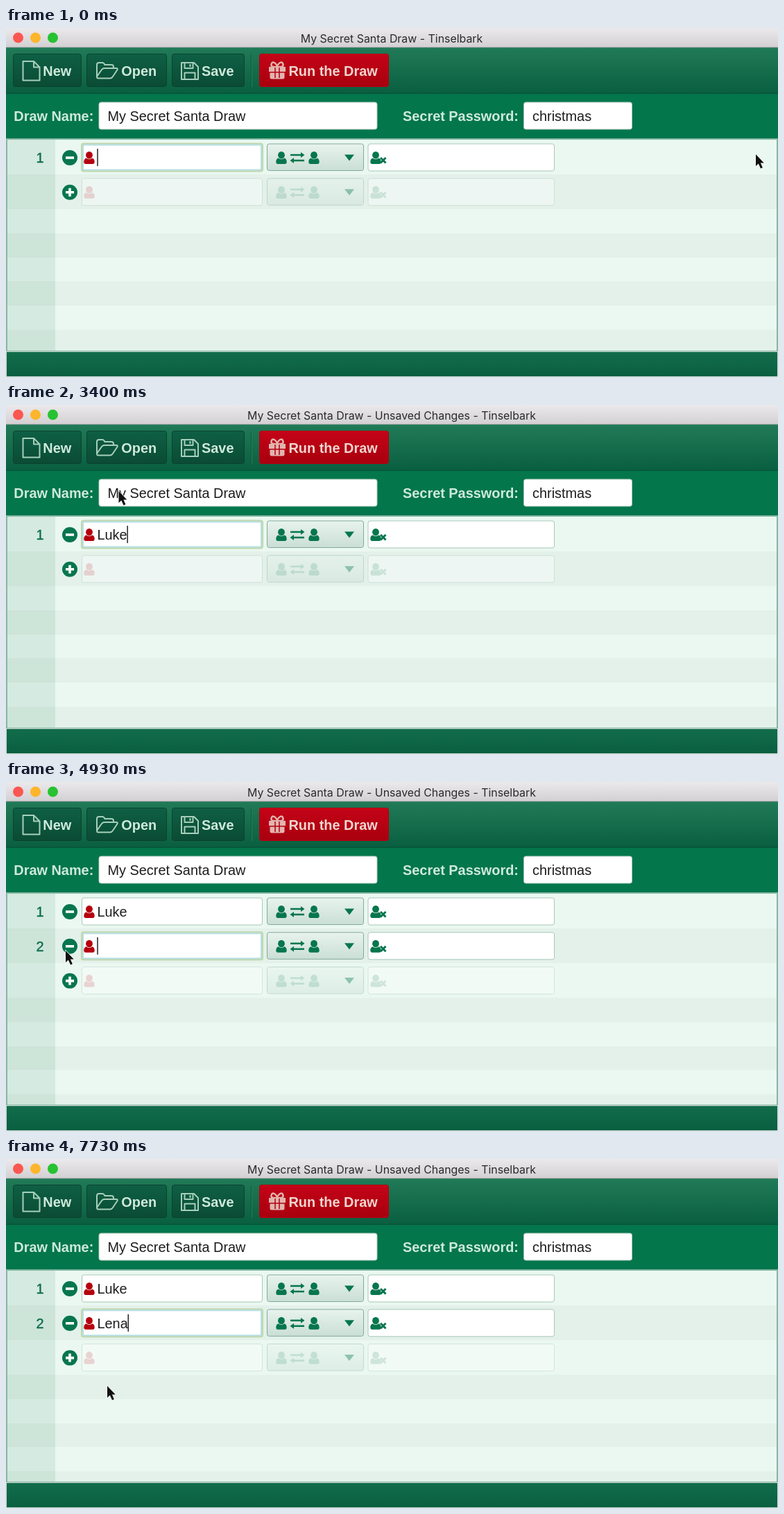
Recreate the animation shown at these times as an HTML page. Size 1113 by 503 pixels, loop 8000 ms.

```html
<!DOCTYPE html>
<html lang="en">
<head>
<meta charset="utf-8">
<title>Gift draw</title>
<style>
  html, body { margin: 0; width: 100%; height: 100%; overflow: hidden; background: #03764c; }
  svg { display: block; width: 1113px; height: 503px; }
  text { font: 19.9px "Liberation Sans", Arial, sans-serif; fill: #1d1d1d; white-space: pre; }
  .bold { font-weight: bold; fill: #cfeadd; }
  .title { font: 15.9px Inter, sans-serif; fill: #2b2b2b; text-anchor: middle; }
  .num { fill: #0b6e49; stroke: #0b6e49; stroke-width: .4; text-anchor: middle; }
  .line { fill: none; stroke: #a6cfbb; stroke-width: 2; stroke-linejoin: round; }
  .green { fill: #06764d; }
  .red { fill: #b5000f; }
  .box { fill: #fff; stroke: #a9c6b9; }
  .combo { fill: url(#combo); stroke: #84a999; }
  .ghost .box, .ghost .combo { opacity: .38; }
  .ghost .icon { opacity: .15; }
  .ghost .arrow { opacity: .38; }
</style>
</head>
<body>
<svg viewBox="0 0 1113 503">
  <defs>
    <linearGradient id="bar" x2="0" y2="1"><stop stop-color="#ebe9eb"/><stop offset="1" stop-color="#d2d0d2"/></linearGradient>
    <linearGradient id="tools" x2="0" y2="1"><stop stop-color="#217a57"/><stop offset="1" stop-color="#095f40"/></linearGradient>
    <linearGradient id="status" x2="0" y2="1"><stop stop-color="#126d4b"/><stop offset="1" stop-color="#095f40"/></linearGradient>
    <linearGradient id="dark" x2="0" y2="1"><stop stop-color="#0e6045"/><stop offset="1" stop-color="#0b4b35"/></linearGradient>
    <linearGradient id="run" x2="0" y2="1"><stop stop-color="#c50318"/><stop offset="1" stop-color="#a8000e"/></linearGradient>
    <linearGradient id="combo" x2="0" y2="1"><stop stop-color="#e8f3ee"/><stop offset="1" stop-color="#cadfd5"/></linearGradient>
    <g id="person">
      <ellipse cy="-3.800" rx="4.900" ry="5.200"/>
      <path d="M-4.500 .5Q0 4 4.500 .5Q7.700 1.500 7.700 6Q7.700 9 5 9H-5Q-7.700 9 -7.700 6Q-7.700 1.500 -4.500 .5z"/>
    </g>
    <g id="swap">
      <path d="M-10-5.300H5V-8L10.500-4L5 0V-2.700H-10zM10 2.700H-5V0L-10.500 4L-5 8V5.300H10z"/>
    </g>
  </defs>

  <rect width="1113" height="28" fill="url(#bar)"/>
  <rect y="27" width="1113" height="1.500" fill="#b9b2b6"/>
  <circle cx="17.500" cy="14" r="7.500" fill="#fc5650"/>
  <circle cx="42.500" cy="14" r="7.500" fill="#fdb52c"/>
  <circle cx="67.500" cy="14" r="7.500" fill="#27c232"/>
  <text id="title" class="title" x="556" y="20.500"></text>

  <rect y="28.500" width="1113" height="66" fill="url(#tools)"/>
  <rect y="93.500" width="1113" height="1.500" fill="#08553a"/>
  <g fill="url(#dark)" stroke="#0a4331">
    <rect x="10.500" y="37.500" width="98" height="47" rx="3"/>
    <rect x="116.500" y="37.500" width="115" height="47" rx="3"/>
    <rect x="239.500" y="37.500" width="104" height="47" rx="3"/>
  </g>
  <path d="M353.500 38V85" stroke="#0d5a3e"/>
  <path d="M354.500 38V85" stroke="#2a7c5c"/>
  <rect x="365.500" y="37.500" width="186" height="47" rx="3" fill="url(#run)" stroke="#b3000f"/>
  <g class="line">
    <path d="M24.500 48H40L48.500 56.500V75.500H24.500zM40 48V56.500H48.500"/>
    <path d="M131 70V53Q131 50 134 50H139Q141 50 142.500 53H152Q155 53 155 56V58M131 70L138 60Q139.500 58 142 58H159Q162 58 160 61L154 70Q152.500 72.500 150 72.500H133Q131 72.500 131 70"/>
    <path d="M253 50H271L277 56V74H253zM257.500 50V58H269.500V50M257.500 74V64.500H272.500V74M265.500 52V56"/>
  </g>
  <g fill="#e2b4ae">
    <path d="M379 56H403V63H379zM380.500 64.500H401.500V71Q401.500 73.500 399 73.500H383Q380.500 73.500 380.500 71z"/>
    <path d="M390 56Q382 57 382.500 53Q383 48 387 50Q389 51 391 55Q393 51 395 50Q399 48 399.500 53Q400 57 392 56" fill="none" stroke="#e2b4ae" stroke-width="2.500"/>
  </g>
  <path d="M388 57V72M394 57V72" stroke="#b00011" stroke-width="1.500"/>
  <text class="bold" x="53.300" y="68.500">New</text>
  <text class="bold" x="166.300" y="68.500">Open</text>
  <text class="bold" x="282" y="68.500">Save</text>
  <text class="bold" x="407.500" y="68.500" style="fill:#f1d6d1">Run the Draw</text>

  <rect y="95" width="1113" height="65" fill="#03764c"/>
  <text class="bold" x="11.300" y="134">Draw Name:</text>
  <text class="bold" x="572" y="134">Secret Password:</text>
  <rect class="box" x="134" y="107" width="401" height="39" rx="3"/>
  <rect class="box" x="746.500" y="107" width="156" height="39" rx="3"/>
  <text x="146.500" y="134">My Secret Santa Draw</text>
  <text x="759" y="134">christmas</text>

  <rect y="159" width="1113" height="308" fill="#86b8a2"/>
  <svg x="2" y="161" width="1109" height="304" viewBox="2 161 1109 304">
    <g id="stripes" shape-rendering="crispEdges"></g>
  </svg>
  <g id="rows"></g>
  <path id="caret" stroke="#222" stroke-width="1.500"/>

  <rect x=".5" y="466.500" width="1112" height="36" fill="url(#status)" stroke="#cfdad4"/>
  <path id="pointer" d="M0 0V17L3.800 13.600L7 20.400L9.900 19.200L6.900 12.500H11.800z" fill="#111" stroke="#fff" stroke-width="1.300" paint-order="stroke"/>
</svg>

<script>
const $ = id => document.getElementById(id);
const LOOP = 8000, PITCH = 49.8;
const TITLE = 'My Secret Santa Draw - ', APP = 'Tinselbark';
const BLUR = 4530, ADDED = 4930;

const entries = [
  { name: 'Luke', keys: [400, 870, 1870, 2270] },
  { name: 'Lena', keys: [6800, 7200, 7400, 7730] }
];
const caretFlips = [1400, 1870, 2790, 3320, 3850, 4270, BLUR, ADDED, 5400, 5930, 6400, 6800];

// Pointer way points: time, x, y
const path = [
  [2600, 1081, 182], [2667, 1068, 181], [2800, 934, 168], [2933, 600, 138], [3067, 256, 119],
  [3200, 256, 119], [3333, 215, 115], [3467, 110, 133], [3600, 21, 170], [3733, 55, 202],
  [3867, 101, 221], [4067, 86, 243], [5333, 86, 243], [5667, 118, 290], [5933, 147, 328],
  [6000, 147, 328], [6067, 146, 327]
];

function stripes(rowCount) {
  let y = 161, out = '';
  for (let i = 0; y < 466; i++) {
    const h = i < rowCount ? 50 : 34.8, odd = i % 2;
    out += `<rect x="2" y="${y}" width="1109" height="${h}" fill="${odd ? '#e3f1ea' : '#eaf8f1'}"/>
      <rect x="2" y="${y}" width="69" height="${h}" fill="${odd ? '#cde4d9' : '#d5eae0'}"/>`;
    y += h;
  }
  return `<g>${out}</g>`;
}

function row(i, ghost) {
  const sign = ghost ? 'M-6 0H6M0-6V6' : 'M-6 0H6';
  return `<g class="${ghost ? 'ghost' : 'live'}" transform="translate(0 ${187 + i * PITCH})">
    ${ghost ? '' : `<text class="num" x="49" y="7">${i + 1}</text>`}
    <circle class="green" cx="92" r="11"/>
    <path d="${sign}" transform="translate(92 0)" stroke="#fff" stroke-width="3.6"/>
    <rect class="box" x="109.500" y="-20" width="260" height="39" rx="3"/>
    <g class="focus" fill="none" stroke-width="2">
      <rect x="109" y="-20.500" width="261" height="40" rx="3" stroke="#c2d7ac"/>
      <rect x="111" y="-18.500" width="257" height="36" rx="2" stroke="#b6e0e2"/>
    </g>
    <use class="icon red" href="#person" x="120"/>
    <rect class="combo" x="376.500" y="-20" width="139" height="38.500" rx="3"/>
    <g class="icon green">
      <use href="#person" x="397"/><use href="#swap" x="420"/><use href="#person" x="444"/>
    </g>
    <path class="arrow green" d="M488-4.500H502L495 4.500z"/>
    <rect class="box" x="522" y="-20" width="268.500" height="39" rx="3"/>
    <g class="icon green">
      <use href="#person" x="533"/>
      <path d="M540 0L547.500 7.500M547.500 0L540 7.500" stroke="#06764d" stroke-width="3"/>
    </g>
    <text class="entry" x="131.500" y="7"></text>
  </g>`;
}

$('stripes').innerHTML = stripes(2) + stripes(3);
$('rows').innerHTML = row(0) + row(1, true) + row(1) + row(2, true);
const [stripesBefore, stripesAfter] = $('stripes').children;
const [first, ghostBefore, second, ghostAfter] = $('rows').children;
const rows = [first, second];

const show = (el, on) => { el.style.display = on ? '' : 'none'; };
const passed = (times, t) => times.filter(at => at <= t).length;
[ghostBefore, ghostAfter].forEach(g => show(g.querySelector('.focus'), false));

function pointerAt(t) {
  const next = path.findIndex(p => p[0] > t);
  if (next === 0) return path[0].slice(1);
  if (next < 0) return path[path.length - 1].slice(1);
  const [t0, x0, y0] = path[next - 1], [t1, x1, y1] = path[next];
  const k = (t - t0) / (t1 - t0);
  return [x0 + (x1 - x0) * k, y0 + (y1 - y0) * k];
}

function draw(t) {
  const added = t >= ADDED;
  show(stripesBefore, !added);
  show(stripesAfter, added);
  show(ghostBefore, !added);
  show(ghostAfter, added);
  show(second, added);

  const active = added ? 1 : 0;
  rows.forEach((r, i) => {
    const { name, keys } = entries[i];
    r.querySelector('.entry').textContent = name.slice(0, passed(keys, t));
    show(r.querySelector('.focus'), i === active && (added || t < BLUR));
  });

  $('title').textContent = TITLE + (t >= 400 ? 'Unsaved Changes - ' : '') + APP;

  const x = 132 + rows[active].querySelector('.entry').getComputedTextLength();
  $('caret').setAttribute('d', `M${x} ${174 + active * PITCH}v25`);
  show($('caret'), passed(caretFlips, t) % 2 === 0);

  // The screen refreshes 15 times a second
  const tick = Math.floor((t + 4) * 0.015) / 0.015;
  const [px, py] = pointerAt(tick);
  $('pointer').setAttribute('transform', `translate(${px.toFixed(1)} ${py.toFixed(1)})`);
}

const start = performance.now();
function loop() {
  draw((performance.now() - start) % LOOP);
  requestAnimationFrame(loop);
}
loop();
</script>
</body>
</html>
```
